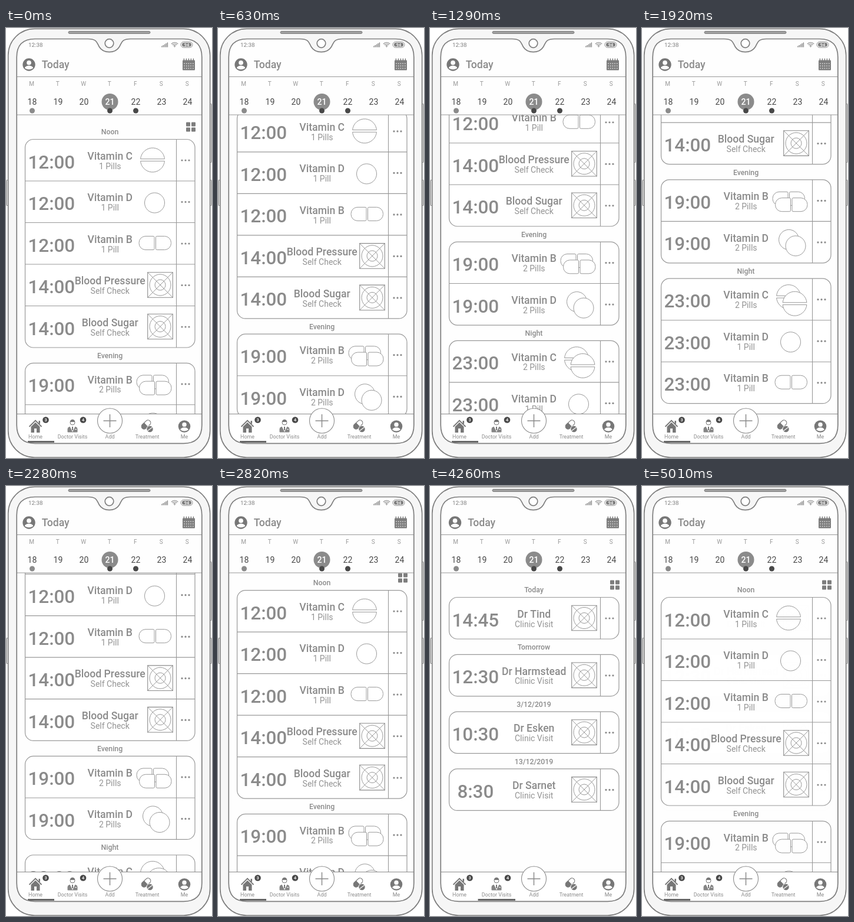
These frames come from a looping animation (350 px wide and 728 px high, 5040 ms). An HTML page with a canvas:

```html
<!DOCTYPE html>
<html lang="en">
<head>
<meta charset="utf-8">
<title>Pill reminder</title>
<style>
html, body { margin: 0; width: 100%; height: 100%; overflow: hidden; background: #fff; }
canvas { display: block; width: 350px; height: 728px; }
</style>
</head>
<body>
<canvas id="stage"></canvas>
<script>
const W = 350, H = 728, LOOP = 5040, MOVE = 540;
const GREY = '#8b8b8b', LINE = '#999', EDGE = '#7f7f7f', DARK = '#484848', WHITE = '#fff';
const ROW = 70.5, GAP = 26.3, FIRST = 188.5;
const scale = Math.max(1, window.devicePixelRatio || 1);

function makeContext(canvas) {
  canvas.width = W * scale;
  canvas.height = H * scale;
  const context = canvas.getContext('2d');
  context.scale(scale, scale);
  return context;
}

const stage = makeContext(document.getElementById('stage'));
const overlay = document.createElement('canvas');
let c = stage;

// Shape helpers
function paint(fill, stroke, width = 1) {
  if (fill) { c.fillStyle = fill; c.fill(); }
  if (stroke) { c.strokeStyle = stroke; c.lineWidth = width; c.stroke(); }
}
function circle(x, y, r, fill, stroke, width) {
  c.beginPath();
  c.arc(x, y, r, 0, Math.PI * 2);
  paint(fill, stroke, width);
}
function box(x, y, w, h, r, fill, stroke, width) {
  c.beginPath();
  c.roundRect(x, y, w, h, r);
  paint(fill, stroke, width);
}
function line(x1, y1, x2, y2, color = LINE, width = 1) {
  c.beginPath();
  c.moveTo(x1, y1);
  c.lineTo(x2, y2);
  paint(null, color, width);
}
function text(str, x, y, size, color = GREY, weight = 400, align = 'center') {
  c.font = `${weight} ${size}px Roboto, sans-serif`;
  c.textAlign = align;
  c.fillStyle = color;
  c.fillText(str, x, y);
}

// Row icons, positioned relative to the row top
function tablet(x, y) { circle(x, y, 17, WHITE, LINE); }

function splitTablet(x, y) {
  const tilt = 0.09;
  circle(x, y, 20.5, WHITE);
  for (const start of [Math.PI + tilt, tilt]) {
    c.beginPath();
    c.arc(x, y, 20.5, start, start + Math.PI - 2 * tilt);
    c.closePath();
    paint(null, LINE);
  }
}
function capsule(x, y) {
  box(x - 27, y - 11.5, 26, 23, [11, 2, 2, 11], WHITE, LINE);
  box(x + 1.5, y - 11.5, 26, 23, [2, 11, 11, 2], WHITE, LINE);
}
function placeholder(x, y) {
  const h = 21.3;
  box(x - h, y - h, h * 2, h * 2, 0, WHITE, GREY, 1.1);
  circle(x, y, 18, null, LINE);
  circle(x, y, 9, null, LINE);
  line(x - h, y - h, x + h, y + h);
  line(x + h, y - h, x - h, y + h);
}
const icons = {
  C: y => splitTablet(249, y + 35),
  D: y => tablet(252.5, y + 37),
  B: y => capsule(253, y + 34.5),
  CC: y => { splitTablet(249, y + 31); splitTablet(259.5, y + 42.5); },
  DD: y => { tablet(249.5, y + 31); tablet(261, y + 41.5); },
  BB: y => { capsule(249, y + 32); capsule(253.5, y + 42.3); },
  X: y => placeholder(262, y + 35)
};

const homeGroups = [
  ['Noon', [
    ['12:00', 'Vitamin C', '1 Pills', 'C'],
    ['12:00', 'Vitamin D', '1 Pill', 'D'],
    ['12:00', 'Vitamin B', '1 Pill', 'B'],
    ['14:00', 'Blood Pressure', 'Self Check', 'X'],
    ['14:00', 'Blood Sugar', 'Self Check', 'X']]],
  ['Evening', [
    ['19:00', 'Vitamin B', '2 Pills', 'BB'],
    ['19:00', 'Vitamin D', '2 Pills', 'DD']]],
  ['Night', [
    ['23:00', 'Vitamin C', '2 Pills', 'CC'],
    ['23:00', 'Vitamin D', '1 Pill', 'D'],
    ['23:00', 'Vitamin B', '1 Pill', 'B']]]
];
const visitGroups = [
  ['Today', '14:45', 'Dr Tind'],
  ['Tomorrow', '12:30', 'Dr Harmstead'],
  ['3/12/2019', '10:30', 'Dr Esken'],
  ['13/12/2019', '8:30', 'Dr Sarnet']
].map(([day, time, name]) => [day, [[time, name, 'Clinic Visit', 'X']]]);

function row([time, title, note, icon], y) {
  text(time, 77.3, y + 49, 31.4, GREY, 500);
  icons[icon](y);
  text(title, 176.7, y + 34.2, 17.6, GREY, 500);
  text(note, 176.7, y + 50.1, 14, '#939393');
  for (const x of [299, 305, 311]) circle(x, y + 35.5, 1.6, GREY);
}

function list(groups, scroll) {
  c.save();
  c.beginPath();
  c.rect(18, 147, 316, 506);
  c.clip();
  c.translate(0, -scroll);
  for (const x of [306, 315])
    for (const y of [159.5, 168.5]) box(x, y, 7, 7, 1, '#7d7d7d');
  let top = FIRST;
  for (const [label, rows] of groups) {
    const height = rows.length * ROW;
    text(label, 176.5, top - 8.3, 12.3, GREY, 500);
    box(32.5, top, 288.5, height, 14, WHITE, LINE, 1.2);
    rows.forEach((entry, i) => {
      if (i) line(32.5, top + i * ROW, 321, top + i * ROW, LINE, 1.1);
      row(entry, top + i * ROW);
    });
    line(289.5, top, 289.5, top + height, LINE, 1.1);
    top += height + GAP;
  }
  c.restore();
}

function person(x, y, r) {
  circle(x, y, r, '#777');
  circle(x, y - r * 0.3, r * 0.36, WHITE);
  c.beginPath();
  c.ellipse(x, y + r * 0.55, r * 0.66, r * 0.38, 0, Math.PI, 0);
  c.quadraticCurveTo(x, y + r, x - r * 0.66, y + r * 0.55);
  paint(WHITE);
}

function statusBar() {
  text('12:38', 38, 32, 9.8, '#7d7d7d', 400, 'left');
  for (let i = 0; i < 5; i++) box(264 + i * 2.4, 30.5 - i * 1.5, 1.5, 2 + i * 1.5, 0, GREY);
  for (const r of [2.5, 5, 7.5]) {
    c.beginPath();
    c.arc(286.5, 32, r, -Math.PI * 0.77, -Math.PI * 0.23);
    paint(null, GREY, 1.2);
  }
  circle(286.5, 31.5, 1, GREY);
  box(297, 23.5, 20, 9.5, 4.7, WHITE, GREY);
  box(299, 25, 16, 6.5, 3, '#7d7d7d');
  text('94', 307, 31, 7.5, WHITE, 500);
}

function header(shift) {
  person(39 + shift, 62, 10.7);
  text('Today', 60.8 + shift, 68.3, 17.6, GREY, 500, 'left');
  box(300, 54.5, 21, 17, 1, '#7d7d7d');
  for (let i = 0; i < 5; i++) {
    box(301.7 + i * 4, 51.5, 1.4, 4, 0.5, '#777');
    for (let j = 0; j < 3; j++) box(302.2 + i * 3.7, 59.5 + j * 4, 1.6, 1.6, 0, '#dedede');
  }
}

function week() {
  line(18, 82.5, 333, 82.5);
  line(18, 147, 333, 147, LINE, 1.2);
  circle(176.5, 125, 14, GREY);
  [...'MTWTFSS'].forEach((day, i) => {
    const x = 44.4 + i * 44;
    text(day, x - 0.7, 98, 10, '#999');
    text(18 + i, x, 130.2, 14, i === 3 ? WHITE : DARK, i === 3 ? 500 : 400);
  });
  circle(44.5, 140, 4.5, GREY);
  circle(176.5, 140, 4.5, DARK);
  circle(220.5, 140, 4.5, DARK);
}

function badge(x, label) {
  circle(x, 663.5, 5.3, DARK);
  text(label, x, 666.4, 8, WHITE, 500);
}

function houseIcon() {
  c.beginPath();
  c.moveTo(39.5, 675);
  c.lineTo(50, 664.5);
  c.lineTo(60.5, 675);
  paint(null, '#777', 1.8);
  box(55.5, 665, 2.5, 5, 0, '#777');
  c.beginPath();
  c.moveTo(42.5, 675);
  c.lineTo(50, 667.7);
  c.lineTo(57.5, 675);
  c.lineTo(57.5, 685);
  c.lineTo(42.5, 685);
  paint('#777');
  box(48, 678, 4, 7, 0, WHITE);
}

function doctorIcon() {
  circle(113, 668, 4, WHITE, '#777', 1);
  c.beginPath();
  c.arc(113, 667, 4.3, Math.PI, 0);
  paint('#777');
  box(104.5, 675, 17, 9.5, [4.5, 4.5, 1, 1], '#858585');
  c.beginPath();
  c.moveTo(108.5, 674.5);
  c.lineTo(117.5, 674.5);
  c.lineTo(113, 684);
  paint(WHITE);
  line(113, 675, 113, 681, DARK, 1.5);
  line(117, 679.5, 120, 679.5, WHITE, 1);
}

function pillsIcon() {
  c.save();
  c.translate(238, 671.5);
  c.rotate(-0.75);
  box(-9, -4.5, 18, 9, 4.5, WHITE, '#777', 1.2);
  box(-9, -4.5, 9, 9, [4.5, 0, 0, 4.5], '#777');
  c.restore();
  circle(244.5, 679, 5.7, '#777', WHITE, 1);
  line(240.5, 682, 248.5, 676, WHITE, 1.1);
}

function tabBar(tab) {
  box(18, 653, 316, 52, 0, WHITE);
  line(18, 653.5, 333, 653.5, GREY, 1.1);
  houseIcon();
  doctorIcon();
  pillsIcon();
  person(303, 674.5, 10.3);
  badge(67.5, '3');
  badge(tab ? 132 : 131, '4');
  const labels = [['Home', 50], ['Doctor Visits', 113], ['Add', 176.5], ['Treatment', 240], ['Me', 303]];
  for (const [label, x] of labels) text(label, x, 695, 8.9);
  const [left, right] = tab ? [81.5, 145] : [37, 82];
  box(left, 699, right - left, 3, 0, '#666');
  circle(176.5, 665, 21, WHITE, GREY, 1.1);
  line(165.5, 665, 187.5, 665, GREY, 1.5);
  line(176.5, 654, 176.5, 676, GREY, 1.5);
}

function screen(tab, scroll) {
  box(18, 18, 316, 686, 0, '#fefefe');
  list(tab ? visitGroups : homeGroups, scroll);
  statusBar();
  header(tab ? 3.5 : 0);
  week();
  tabBar(tab);
}

function screenOutline() {
  const l = 18.2, r = 332.8, t = 18.5, b = 703.3, k = 31, mid = 175.5;
  c.moveTo(l, t + k);
  c.quadraticCurveTo(l, t, l + k, t);
  c.lineTo(mid - 36, t);
  c.bezierCurveTo(mid - 20, t, mid - 21, 26, mid - 17, 32);
  c.bezierCurveTo(mid - 10, 43.5, mid + 10, 43.5, mid + 17, 32);
  c.bezierCurveTo(mid + 21, 26, mid + 20, t, mid + 36, t);
  c.lineTo(r - k, t);
  c.quadraticCurveTo(r, t, r, t + k);
  c.lineTo(r, b - k);
  c.quadraticCurveTo(r, b, r - k, b);
  c.lineTo(l + k, b);
  c.quadraticCurveTo(l, b, l, b - k);
  c.closePath();
}

function phone() {
  box(0.5, 257.5, 4, 43, 1, '#ddd', GREY);
  box(346, 128.5, 3.5, 99, 1, '#ddd', GREY);
  box(346, 257.5, 3.5, 43, 1, '#ddd', GREY);
  c.beginPath();
  c.roundRect(3.7, 1.3, 343, 725.7, 45);
  screenOutline();
  c.fillStyle = '#f6f6f6';
  c.fill('evenodd');
  paint(null, EDGE, 1.7);
  box(106, 5.5, 139, 4, 2, '#a0a0a0', EDGE);
  circle(175.5, 26, 7.3, WHITE, EDGE, 1.7);
}

// Motion
const ease = p => 1 - (1 - p) ** 4;
const scrollMoves = [[450, 61], [990, 211], [1530, 311], [2100, 61], [2640, 0]];
const tabMoves = [[3630, 1], [4590, 0]];

function follow(moves, time) {
  let value = 0;
  for (const [start, goal] of moves) {
    const p = Math.min(1, Math.max(0, (time - start) / MOVE));
    value += (goal - value) * ease(p);
  }
  return value;
}

function frame() {
  const time = performance.now() % LOOP;
  c.fillStyle = WHITE;
  c.fillRect(0, 0, W, H);
  screen(0, follow(scrollMoves, time));
  c.globalAlpha = follow(tabMoves, time);
  c.drawImage(overlay, 0, 0, W, H);
  c.globalAlpha = 1;
  phone();
  requestAnimationFrame(frame);
}

c = makeContext(overlay);
screen(1, 0);
c = stage;
frame();
</script>
</body>
</html>
```
